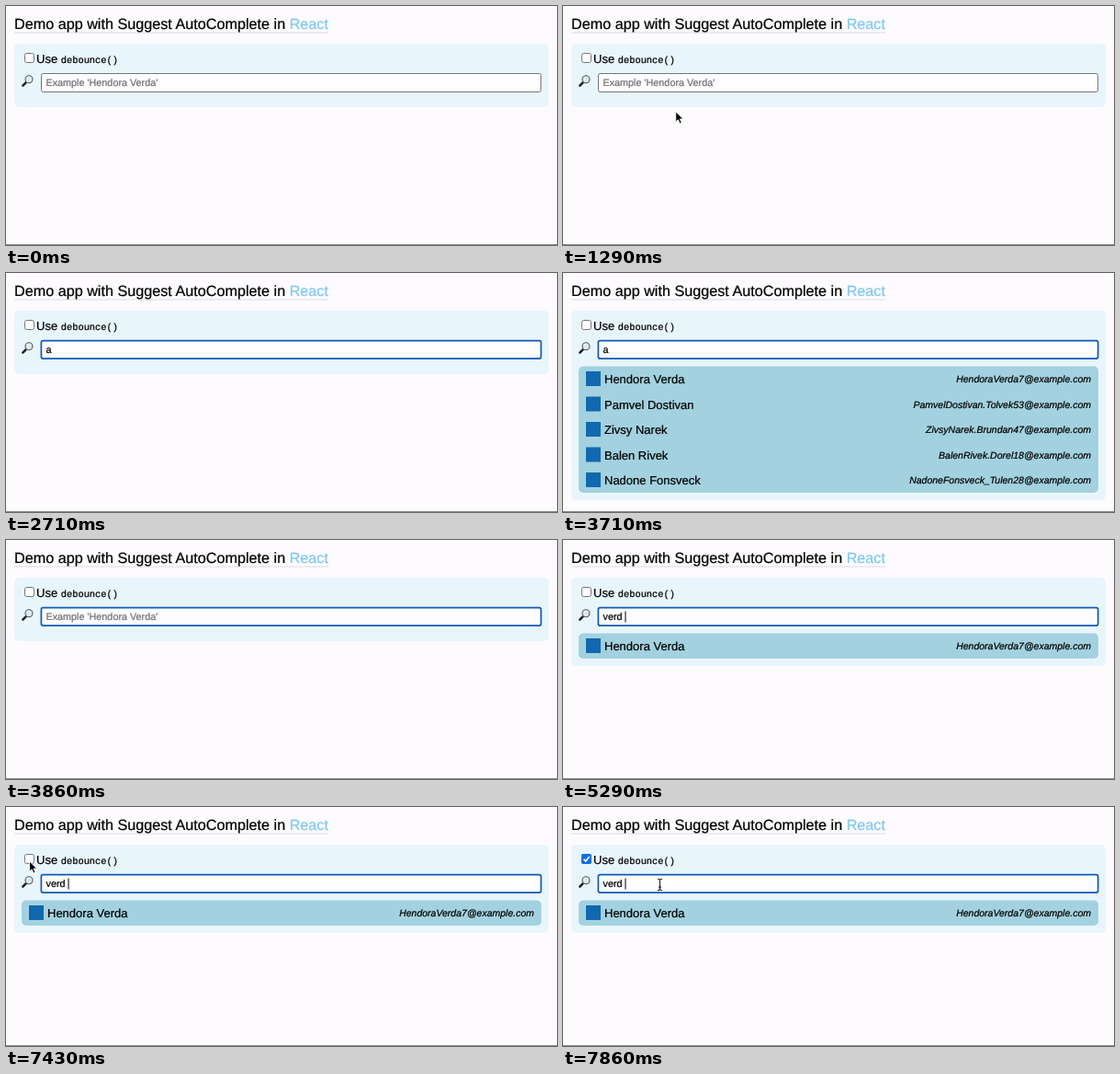
These frames come from a looping animation (600 by 260 pixels, 8 s). An HTML page:

```html
<!DOCTYPE html>
<html lang="en">
<head>
<meta charset="utf-8">
<title>Suggest AutoComplete demo</title>
<style>
  html, body { margin: 0; width: 100%; height: 100%; overflow: hidden; background: #fdfbfe; }
  svg { display: block; width: 600px; height: 260px; color: #000; }
  /* the thin stroke gives the slightly heavier smoothed look */
  text, tspan { fill: currentColor; stroke: currentColor; stroke-width: .22px; }
  text { font-family: "Liberation Sans", Arial, sans-serif; text-rendering: geometricPrecision; white-space: pre; }
  .title { font-size: 16.2px; }
  .name { font-size: 13px; }
  .mail { font-size: 10.5px; font-style: italic; text-anchor: end; }
  .field { font-size: 10.8px; }
  .code { font: 10.4px "Liberation Mono", "Courier New", monospace; }
  .link { color: #7ec8f1; }
  .hint { color: #707073; }
</style>
</head>
<body>
<svg viewBox="0 0 600 260">
  <rect width="600" height="260" fill="#fdfbfe"/>
  <rect y="259" width="600" height="1" fill="#8f918f"/>

  <rect x="9" y="28.5" width="342" height="1" fill="#dcdbde"/>
  <text class="title" x="9" y="25">Demo app with Suggest AutoComplete in <tspan class="link">React</tspan></text>

  <rect id="panel" x="9" y="41" width="582" height="69" rx="5" fill="#e9f5fc"/>

  <rect x="20.5" y="51.5" width="10" height="10" rx="2" fill="#fff" stroke="#767676"/>
  <g id="checked">
    <rect x="20" y="51" width="11" height="11" rx="2" fill="#0d70e4"/>
    <path d="M22.5 56.7l2.2 2.3 4-5" fill="none" stroke="#fff" stroke-width="1.6"/>
  </g>
  <text class="name" x="33" y="62">Use</text>
  <text class="code" x="59.7" y="62">debounce()</text>

  <g stroke-linecap="round">
    <path d="M21.6 83.4l-3.2 3.2" stroke="#222" stroke-width="2.6"/>
    <circle cx="25" cy="79.7" r="4" fill="#dde9ee" stroke="#55585b" stroke-width="1.1"/>
    <path d="M23 78.6a2.6 2.6 0 0 1 2-1.4" fill="none" stroke="#fff"/>
  </g>

  <rect x="38.5" y="73.5" width="544" height="20" rx="2" fill="#fefdff" stroke="#767676"/>
  <rect id="ring" x="38.4" y="73.7" width="544.2" height="19.4" rx="2" fill="#fefdff" stroke="#0f58b8" stroke-width="1.7"/>
  <text id="hint" class="field hint" x="43.5" y="87"></text>
  <text id="typed" class="field" x="43.5" y="87"></text>
  <rect id="caret" y="77.5" width="1" height="12"/>

  <rect id="list" x="17" y="101.5" width="566" rx="5" fill="#a3d1df"/>
  <g id="rows"></g>

  <path id="arrow" d="M0 0v11.2l2.6-2.4 1.9 4.3 2-.9-1.9-4.2h3.5z" stroke="#fff" stroke-width=".9"/>
  <g id="beam" fill="none">
    <path d="M-2.6-6.3q2.6 0 2.6 1.6v9.4q0 1.6-2.6 1.6M2.6-6.3q-2.6 0-2.6 1.6M0 4.7q0 1.6 2.6 1.6M-1.4 2.6h2.8" stroke="#222" stroke-width="1.1"/>
  </g>
</svg>
<script>
const FPS = 7, STEPS = 56, LOOP = 8000, ROW = 27.5;
const people = [
  ["Hendora Verda", "HendoraVerda7@example.com"],
  ["Pamvel Dostivan", "PamvelDostivan.Tolvek53@example.com"],
  ["Zivsy Narek", "ZivsyNarek.Brundan47@example.com"],
  ["Balen Rivek", "BalenRivek.Dorel18@example.com"],
  ["Nadone Fonsveck", "NadoneFonsveck_Tulen28@example.com"]
];

// Timelines: [step, value], each value holds until the next step
const typing = [[0, ""], [15, "a"], [27, ""], [28, "v"], [29, "ve"], [30, "ver"], [32, "verd"], [35, "verd "]];
const results = [[0, 0], [20, 5], [27, 0], [33, 1]];
const focus = [[0, false], [11, true], [53, false], [55, true]];
const caretOn = [[0, false], [11, true], [14, false], [15, true], [18, false], [21, true], [25, false],
  [28, true], [39, false], [42, true], [46, false], [49, true], [53, false], [55, true]];
const mouseOn = [[0, false], [6, true], [15, false], [46, true]];
// Mouse path: [step, x, y]
const path = [[6, 150, 172], [11, 108, 84], [46, 108, 84], [52, 25.5, 59], [53, 25.5, 59], [55, 105.5, 84.5]];

const $ = id => document.getElementById(id);
const show = (id, on) => $(id).setAttribute("visibility", on ? "visible" : "hidden");
const at = (line, k) => line.filter(p => p[0] <= k).pop()[1];

function mouseAt(k) {
  const i = path.findIndex(p => p[0] >= k);
  if (i <= 0) return path[0].slice(1);
  const [a, x0, y0] = path[i - 1], [b, x1, y1] = path[i];
  const u = (k - a) / (b - a), e = u * u * (3 - 2 * u);
  return [x0 + (x1 - x0) * e, y0 + (y1 - y0) * e];
}

$("hint").textContent = `Example '${people[0][0]}'`;
$("rows").innerHTML = people.map(([name, mail], i) => `<g transform="translate(0 ${i * ROW})">
  <rect x="25" y="107" width="16" height="16" fill="#1268ae"/>
  <text class="name" x="45" y="120">${name}</text>
  <text class="mail" x="575" y="119">${mail}</text></g>`).join("");

function draw(ms) {
  const k = Math.floor((ms % LOOP + 5) * FPS / 1000) % STEPS;
  const text = at(typing, k), count = at(results, k);

  $("typed").textContent = text;
  show("hint", !text);
  show("ring", at(focus, k));
  show("caret", at(caretOn, k));
  $("caret").setAttribute("x", 43.5 + (text ? $("typed").getComputedTextLength() : 0));
  show("checked", k >= 53);

  const height = count * ROW;
  $("list").setAttribute("height", height);
  $("panel").setAttribute("height", 69 + Math.floor(height));
  [...$("rows").children].forEach((row, i) => row.setAttribute("visibility", i < count ? "visible" : "hidden"));

  const [x, y] = mouseAt(k), on = at(mouseOn, k);
  const inField = x > 38 && y > 73 && y < 94;
  for (const id of ["arrow", "beam"]) {
    $(id).setAttribute("transform", `translate(${x} ${y})`);
    show(id, on && inField === (id === "beam"));
  }
}

let start;
function tick(now) {
  start ??= now;
  draw(now - start);
  requestAnimationFrame(tick);
}
draw(0);
requestAnimationFrame(tick);
</script>
</body>
</html>
```
